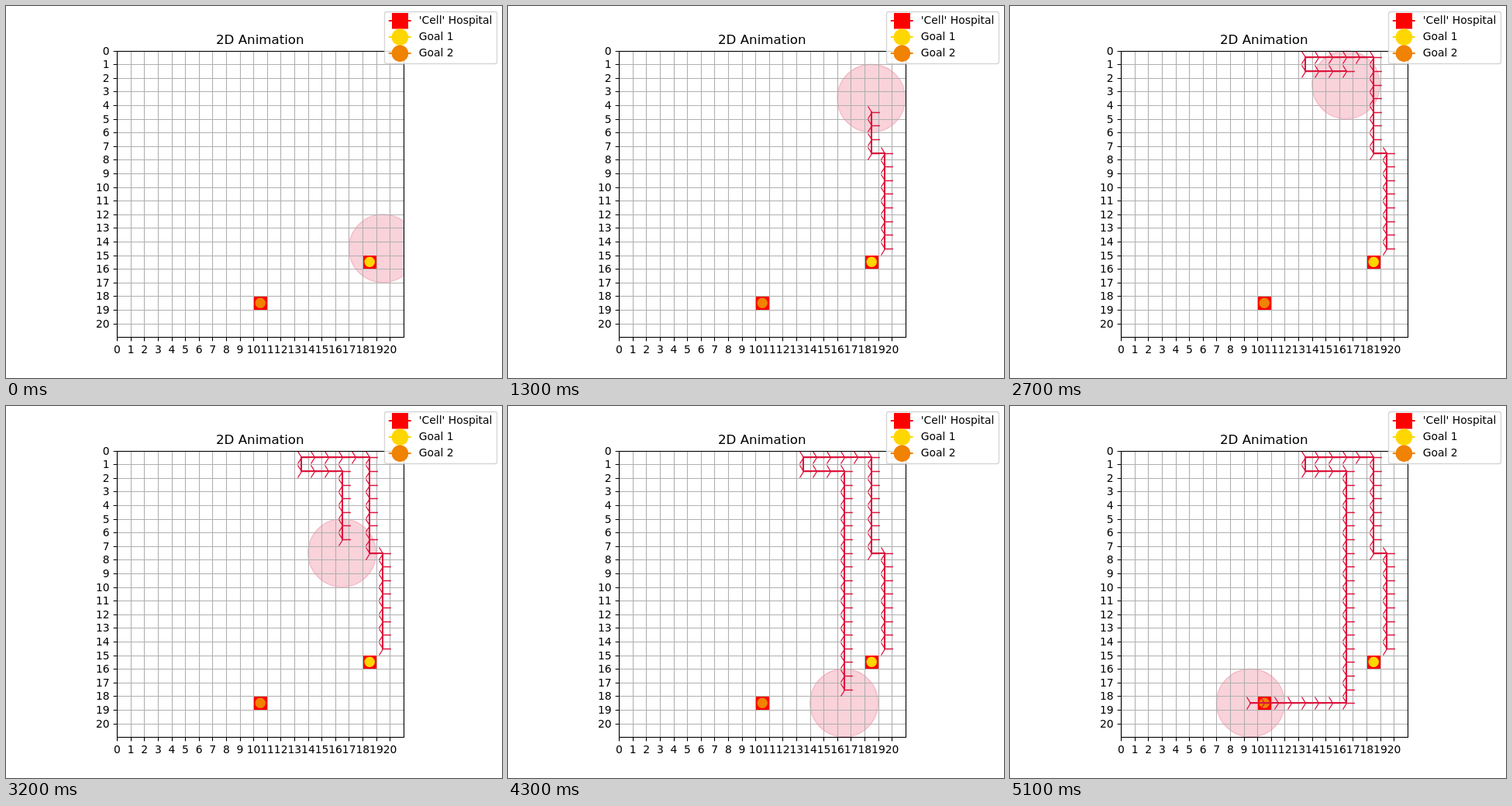
Recreate the animation shown at these times as an HTML page. Size 640 by 480 pixels, loop 5200 ms.

```html
<!DOCTYPE html>
<html>
<head>
<meta charset="utf-8">
<style>
html, body { margin: 0; width: 100%; height: 100%; overflow: hidden; background: #fff; }
svg { display: block; width: 640px; height: 480px; }
text { font-family: "DejaVu Sans", sans-serif; font-size: 13.89px; fill: #000; }
</style>
</head>
<body>
<svg id="stage" viewBox="0 0 640 480">
  <defs><clipPath id="plot"><rect x="143.2" y="57.6" width="369.6" height="369.6"/></clipPath></defs>
  <rect width="640" height="480" fill="#fff"/>
  <g clip-path="url(#plot)">
    <circle id="range" r="44" fill="#dc143c" fill-opacity=".19" stroke="#dc143c" stroke-opacity=".19" stroke-width="1.39"/>
  </g>
  <path id="grid" fill="none" stroke="#b0b0b0" stroke-width="1.11"/>
  <path id="ticks" fill="none" stroke="#000" stroke-width="1.11"/>
  <g id="goals"></g>
  <g clip-path="url(#plot)" fill="none" stroke="#dc143c">
    <path id="line" stroke-width="2.08" stroke-linejoin="round" stroke-linecap="square"/>
    <path id="marks" stroke-width="1.39"/>
  </g>
  <rect x="143.5" y="58.5" width="370" height="369" fill="none" stroke="#000" stroke-width="1.11"/>
  <g id="labels"></g>
  <text x="327.8" y="49" text-anchor="middle" style="font-size:16.67px">2D Animation</text>
  <rect x="488.5" y="7.5" width="145" height="67" rx="2.8" fill="#fff" fill-opacity=".8" stroke="#ccc" stroke-opacity=".8" stroke-width="1.39"/>
  <g id="legend"></g>
</svg>
<script>
const CELL = 17.6, LEFT = 143.2, TOP = 57.6, SIZE = 21;
const STEP = 100, LOOP = 5200;
const RED = '#ff0000', GOLD = '#ffd700', ORANGE = '#f08204';

const el = id => document.getElementById(id);
const px = x => LEFT + x * CELL;
const py = y => TOP + y * CELL;
const snap = v => Math.round(v) + 0.5;

function add(parent, tag, attrs, text) {
  const node = document.createElementNS('http://www.w3.org/2000/svg', tag);
  for (const key in attrs) node.setAttribute(key, attrs[key]);
  if (text !== undefined) node.textContent = text;
  el(parent).appendChild(node);
}

function drawAxes() {
  let grid = '', ticks = '';
  for (let i = 0; i < SIZE; i++) {
    const x = snap(px(i)), y = snap(py(i));
    grid += `M${x} 58V427M143 ${y}H513`;
    ticks += `M${x} 427.5v4.9M143.5 ${y}h-4.9`;
    add('labels', 'text', { x: px(i) + 0.3, y: 448, 'text-anchor': 'middle' }, i);
    add('labels', 'text', { x: 133.7, y: Math.round(py(i)) + 5, 'text-anchor': 'end' }, i);
  }
  el('grid').setAttribute('d', grid);
  el('ticks').setAttribute('d', ticks);
}

function drawGoal(x, y, color) {
  const cx = Math.round(px(x)), cy = Math.round(py(y));
  add('goals', 'rect', { x: cx - 8, y: cy - 8, width: 17, height: 17, fill: RED });
  add('goals', 'circle', { cx: cx + 0.2, cy: cy + 0.2, r: 6.7, fill: color });
}

function drawLegend() {
  const rows = [["'Cell' Hospital", RED], ['Goal 1', GOLD], ['Goal 2', ORANGE]];
  rows.forEach(([name, color], i) => {
    const y = 19 + i * 21;
    add('legend', 'path', { d: `M493.8 ${y}H522.6`, stroke: color, 'stroke-width': 2 });
    if (i) add('legend', 'circle', { cx: 508.4, cy: y + 0.2, r: 10.8, fill: color });
    else add('legend', 'rect', { x: 498, y: 9, width: 21, height: 20.5, fill: color });
    add('legend', 'text', { x: 532.8, y: y + 4 + (i ? 0.3 : 0) }, name);
  });
}

// One cell per step; a repeated corner is a one-step pause.
function buildRoute() {
  const corners = [
    [19.5, 14.5], [19.5, 7.5], [19.5, 7.5], [18.5, 7.5], [18.5, 0.5], [13.5, 0.5],
    [13.5, 0.5], [13.5, 1.5], [16.5, 1.5], [16.5, 18.5], [9.5, 18.5], [9.5, 18.5]
  ];
  const route = [corners[0]];
  for (let i = 1; i < corners.length; i++) {
    const [ax, ay] = corners[i - 1], [bx, by] = corners[i];
    const n = Math.abs(bx - ax) + Math.abs(by - ay) || 1;
    for (let k = 1; k <= n; k++) route.push([ax + (bx - ax) * k / n, ay + (by - ay) * k / n]);
  }
  return route;
}

const route = buildRoute();
let shown = -1;

function render(time) {
  const step = Math.floor((time % LOOP) / STEP);
  if (step === shown) return;
  shown = step;
  const [x, y] = route[step];
  el('range').setAttribute('cx', px(x));
  el('range').setAttribute('cy', py(y));
  const trail = route.slice(0, step).map(p => [Math.round(px(p[0])), Math.round(py(p[1]))]);
  el('line').setAttribute('d', trail.length > 1 ? 'M' + trail.join('L') : '');
  el('marks').setAttribute('d', trail.map(([a, b]) =>
    `M${a + 0.5} ${b + 0.5}h10.4m-10.4 0l-5 8m5 -8l-5 -8`).join(''));
}

drawAxes();
drawGoal(18.5, 15.5, GOLD);
drawGoal(10.5, 18.5, ORANGE);
drawLegend();

const start = performance.now();
function tick() {
  render(performance.now() - start);
  requestAnimationFrame(tick);
}
render(0);
requestAnimationFrame(tick);
</script>
</body>
</html>
```
